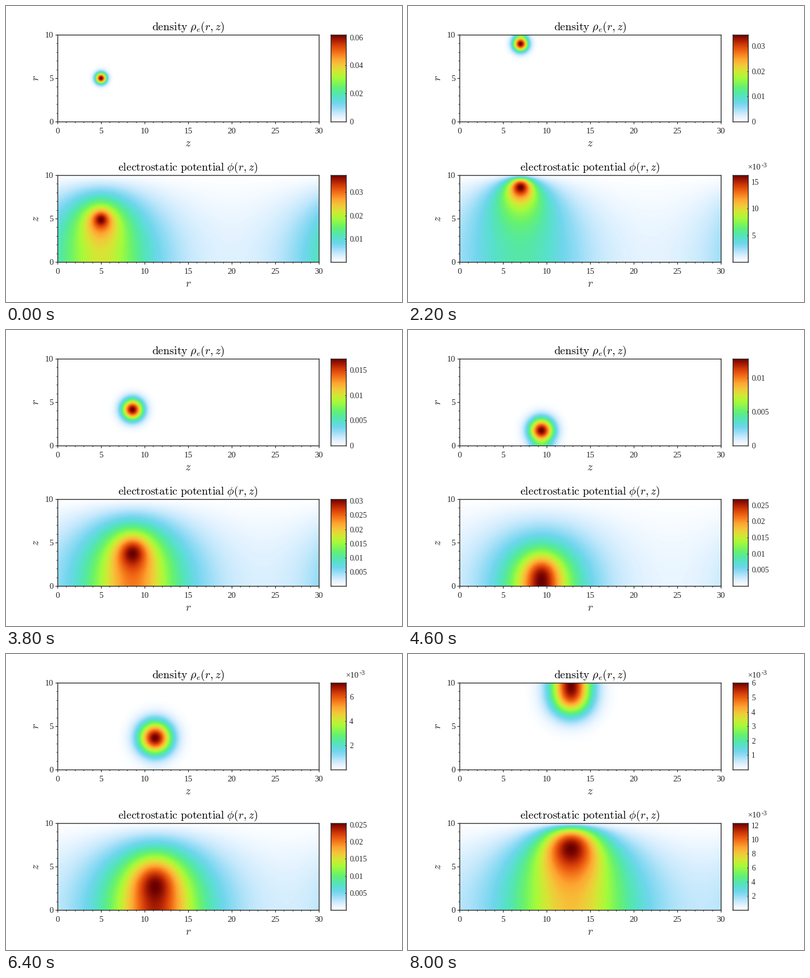
A matplotlib script that plays this animation: 700x525 px, repeating every 8.2 s.

```python
import numpy as np
import matplotlib.pyplot as plt
from matplotlib.animation import FuncAnimation
from matplotlib.colors import LinearSegmentedColormap
from matplotlib.ticker import MultipleLocator

W, H, DPI = 700, 525, 100
PT = 72 / DPI
INK = "#262626"
FRAMES, INTERVAL = 41, 200

plt.rcParams.update({
    "font.family": "Liberation Serif",
    "mathtext.fontset": "cm",
    "axes.edgecolor": INK,
    "axes.linewidth": 1.4 * PT,
})

CMAP = LinearSegmentedColormap.from_list("white_turbo", [
    (0.00, "#ffffff"), (0.05, "#e4f3ff"), (0.10, "#c4e8fc"),
    (0.16, "#93dcf5"), (0.21, "#70d6ec"), (0.27, "#58e0cd"),
    (0.33, "#56e8a2"), (0.40, "#68f26c"), (0.50, "#a6fb3a"),
    (0.58, "#d6e635"), (0.65, "#f3c73a"), (0.72, "#fea431"),
    (0.80, "#f26d16"), (0.88, "#d33b08"), (0.95, "#9a1502"),
    (1.00, "#690000")], N=256)

# Cell-centred grid: z periodic over LZ, conducting wall at r = LR
LZ, LR, NZ, NR = 30.0, 10.0, 300, 100
dz, dr = LZ / NZ, LR / NR
z = (np.arange(NZ) + 0.5) * dz
r = (np.arange(NR) + 0.5) * dr


def poisson_inverse():
    """Inverse of the cylindrical Laplacian for every Fourier mode in z."""
    inner, outer = (r - dr / 2) / (r * dr**2), (r + dr / 2) / (r * dr**2)
    lap = np.diag(inner + outer) - np.diag(outer[:-1], 1) - np.diag(inner[1:], -1)
    lap[-1, -1] += outer[-1]
    k = 2 * np.pi * np.fft.rfftfreq(NZ, dz)
    return np.linalg.inv(lap + k[:, None, None]**2 * np.eye(NR))


INVERSE = poisson_inverse()


def density(t):
    """Free-streaming Gaussian bunch, reflected at r = 0 and r = LR."""
    var = 0.2 + 0.04 * t**2
    rc, zc = 5 + 3 * t, 5 + t
    prof = sum(np.exp(-(r - 2 * LR * m - s * rc)**2 / (2 * var))
               for m in range(-2, 3) for s in (-1, 1))
    return 0.0628 * 0.2 / var * np.outer(prof, np.exp(-(z - zc)**2 / (2 * var)))


def potential(rho):
    modes = np.fft.rfft(rho, axis=1).T[:, :, None]
    return np.fft.irfft((INVERSE @ modes)[:, :, 0].T, NZ, axis=1)


fig = plt.figure(figsize=(W / DPI, H / DPI), dpi=DPI, facecolor="white")


def add_axes(x0, y0, x1, y1):
    return fig.add_axes([x0 / W, 1 - y1 / H, (x1 - x0) / W, (y1 - y0) / H])


def put(x, y, s, size, color="black", **kw):
    return fig.text(x / W, 1 - y / H, s, fontsize=size * PT, color=color, **kw)


class Panel:
    def __init__(self, top, title, xlabel, ylabel, has_zero):
        self.has_zero = has_zero
        bottom = top + 154
        ax = add_axes(91, top, 553, bottom)
        self.image = ax.imshow(np.zeros((NR, NZ)), extent=(0, LZ, 0, LR),
                               origin="lower", aspect="auto", cmap=CMAP,
                               interpolation="bilinear")
        for axis, pad in ((ax.xaxis, 7), (ax.yaxis, 3)):
            axis.set_major_locator(MultipleLocator(5))
            axis.set_minor_locator(MultipleLocator(1))
            axis.set_tick_params(which="both", color=INK, width=1.2 * PT)
            axis.set_tick_params(length=4 * PT, pad=pad * PT,
                                 labelsize=15 * PT, labelcolor=INK)
            axis.set_tick_params(which="minor", length=2.5 * PT)

        self.cax = add_axes(574, top - 0.5, 601, bottom)
        self.cax.imshow(np.linspace(0, 1, 256)[:, None], extent=(0, 1, 0, 1),
                        origin="lower", aspect="auto", cmap=CMAP)
        self.cax.set_xticks([])
        self.cax.yaxis.tick_right()
        self.cax.tick_params(axis="y", direction="in", length=2 * PT,
                             width=PT, pad=6 * PT, color=INK,
                             labelsize=13.7 * PT, labelcolor=INK)

        put(322, top - 8.5, title, 19.8, ha="center")
        put(322, bottom + 44, xlabel, 19.8, INK, ha="center")
        put(54, top + 77, ylabel, 19.8, INK, ha="center", va="center", rotation=90)
        self.exponent = [put(601, top - 9.5, "×10", 14.7, INK),
                         put(624.5, top - 14, "-3", 12.2, INK)]

    def show(self, data):
        lo, hi = data.min(), data.max()
        self.image.set_data(data)
        self.image.set_clim(lo, hi)

        zero = self.has_zero and hi >= 0.01
        for step in (0.0005, 0.001, 0.002, 0.005, 0.01, 0.02):
            n = int(hi / step)
            if n + zero <= 6:
                break
        ticks = np.arange(0 if zero else 1, n + 1) * step
        scaled = hi < (0.01 if self.has_zero else 0.02)
        self.cax.set_yticks((ticks - lo) / (hi - lo),
                            [f"{v * (1000 if scaled else 1):.4g}" for v in ticks])
        self.cax.set_ylim(0, 1)
        for part in self.exponent:
            part.set_visible(scaled)


top_panel = Panel(51, r"$\mathrm{density}\ \rho_e(r,z)$", "$z$", "$r$", True)
low_panel = Panel(300, r"$\mathrm{electrostatic}\ \mathrm{potential}\ \phi(r,z)$",
                  "$r$", "$z$", False)


def update(i):
    # The first step is short, then output every 0.2 time units
    t = 0.2 * (i - 1) + 1 / 60 if i else 0.0
    rho = density(t)
    top_panel.show(rho)
    low_panel.show(potential(rho))
    return []


anim = FuncAnimation(fig, update, frames=FRAMES, init_func=lambda: update(0),
                     interval=INTERVAL, repeat=True, repeat_delay=0, blit=False)
plt.show()
```
